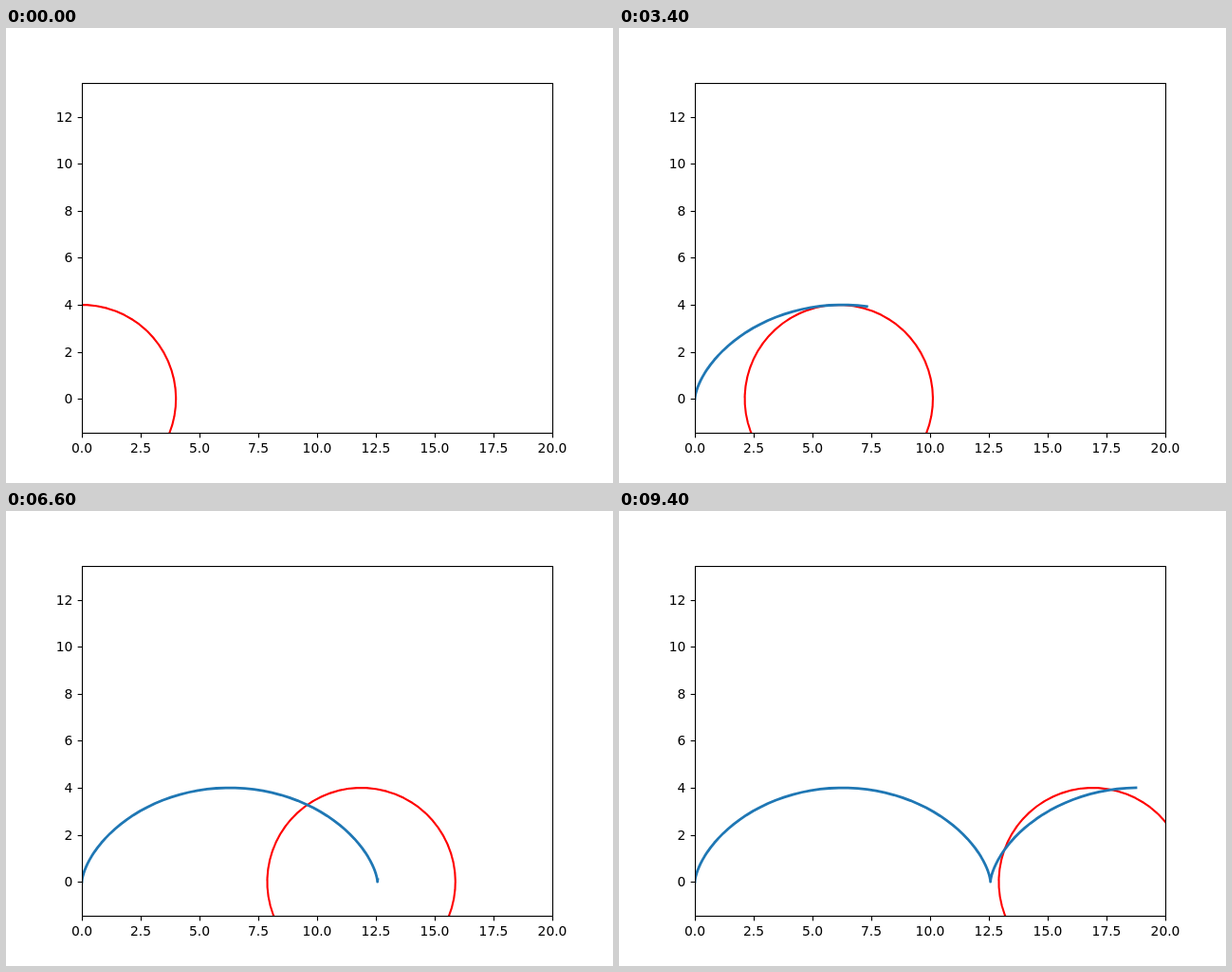
An HTML page with a canvas for the animation above (9500 ms loop, 640 by 480 pixels).

```html
<!DOCTYPE html>
<html lang="en">
<head>
<meta charset="utf-8">
<title>Cycloid</title>
<style>
  html, body { margin: 0; width: 100%; height: 100%; overflow: hidden; background: #fff; }
  canvas { display: block; }
</style>
</head>
<body>
<canvas id="plot" width="640" height="480"></canvas>
<script>
const ctx = document.getElementById('plot').getContext('2d');
const PT = 100 / 72;              // one point in pixels
const SCALE = 24.8;               // pixels per data unit
const STEPS = 95, STEP_MS = 100, STEP = 0.1;
const BOX = { left: 80, top: 58, right: 576, bottom: 427 };

const px = x => 80 + x * SCALE;
const py = y => 391.2 - y * SCALE;

function curve(count, point, color, width) {
  if (count < 2) return;
  ctx.beginPath();
  for (let i = 0; i < count; i++) {
    const [x, y] = point(i * STEP);
    ctx.lineTo(px(x), py(y));
  }
  ctx.strokeStyle = color;
  ctx.lineWidth = width * PT;
  ctx.lineJoin = 'round';
  ctx.lineCap = 'square';
  ctx.stroke();
}

function tick(x, y, dx, dy) {
  ctx.beginPath();
  ctx.moveTo(x, y);
  ctx.lineTo(x + dx, y + dy);
  ctx.stroke();
}

function drawAxes() {
  ctx.strokeStyle = ctx.fillStyle = '#000';
  ctx.lineWidth = 0.8 * PT;
  ctx.lineJoin = 'miter';
  ctx.lineCap = 'butt';
  ctx.font = `${10 * PT}px "DejaVu Sans", sans-serif`;
  ctx.textBaseline = 'alphabetic';
  ctx.strokeRect(BOX.left + 0.5, BOX.top + 0.5, BOX.right - BOX.left, BOX.bottom - BOX.top);

  ctx.textAlign = 'center';
  for (let v = 0; v <= 20; v += 2.5) {
    const x = Math.round(px(v));
    tick(x + 0.5, BOX.bottom + 0.5, 0, 3.5 * PT);
    ctx.fillText(v.toFixed(1), x, 448);
  }
  ctx.textAlign = 'right';
  for (let v = 0; v <= 12; v += 2) {
    const y = Math.round(py(v));
    tick(BOX.left + 0.5, y + 0.5, -3.5 * PT, 0);
    ctx.fillText(v, 70.3, y + 5);
  }
}

function draw(step) {
  const center = 1.8 * step * STEP;
  ctx.fillStyle = '#fff';
  ctx.fillRect(0, 0, 640, 480);

  ctx.save();
  ctx.beginPath();
  ctx.rect(BOX.left, BOX.top, BOX.right - BOX.left, BOX.bottom - BOX.top);
  ctx.clip();
  // The circle runs one and a half turns, so its upper half overlaps itself.
  curve(STEPS, a => [center + 4 * Math.cos(a), 4 * Math.sin(a)], '#ff0000', 1.5);
  curve(step + 1, a => [2 * (a - Math.sin(a)), 2 * (1 - Math.cos(a))], '#1f77b4', 2);
  ctx.restore();

  drawAxes();
}

function loop() {
  draw(Math.floor(performance.now() / STEP_MS) % STEPS);
  requestAnimationFrame(loop);
}
loop();
</script>
</body>
</html>
```
